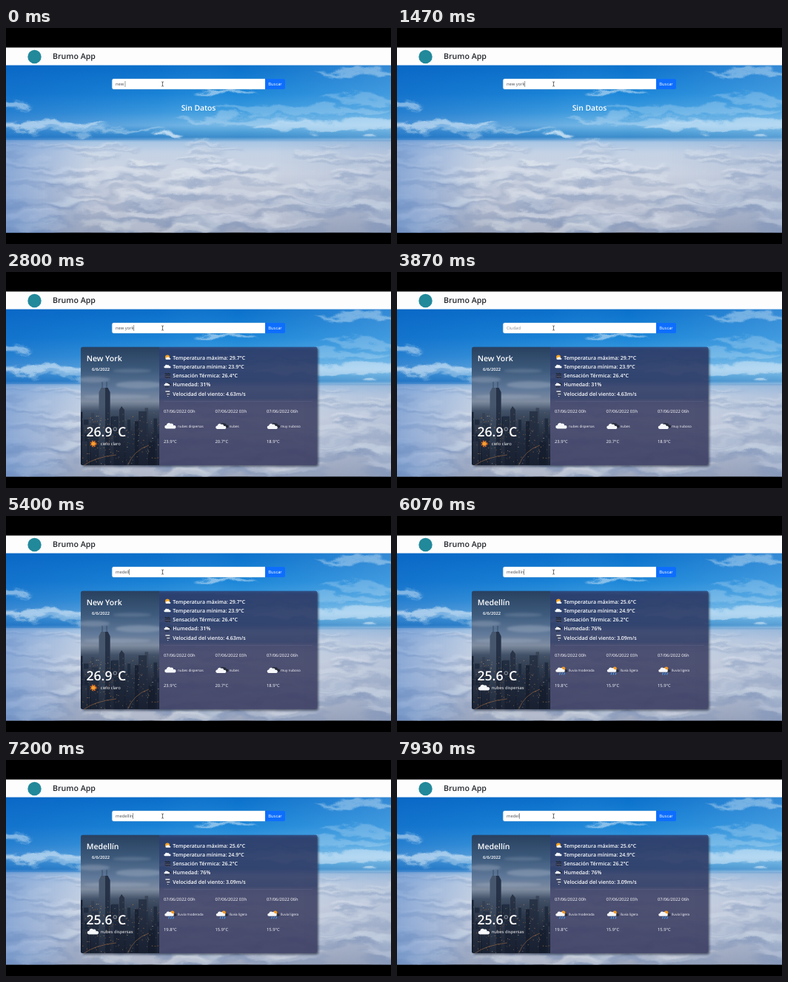
Write an HTML page that moves like this. It is 520x293 px and loops after 8000 ms.

```html
<!DOCTYPE html>
<html lang="es">
<head>
<meta charset="utf-8">
<title>Brumo App</title>
<style>
html, body { margin: 0; width: 100%; height: 100%; overflow: hidden; background: #000; }
svg { display: block; width: 100vw; height: 100vh; }
text { font-family: "Open Sans", "Noto Sans", sans-serif; font-size: 5.8px; fill: #fff; white-space: pre; text-rendering: geometricPrecision; }
.bold text, text.bold { font-weight: 600; }
.small { font-size: 4.6px; }
</style>
</head>
<body>
<svg viewBox="0 0 520 293" preserveAspectRatio="none">
  <defs>
    <linearGradient id="sky" x2="0" y2="1">
      <stop offset="0" stop-color="#0a70cb"/>
      <stop offset=".17" stop-color="#1b86d8"/>
      <stop offset=".28" stop-color="#3f9ddf"/>
      <stop offset=".36" stop-color="#73b6e5"/>
      <stop offset=".4" stop-color="#4b9dd7"/>
      <stop offset=".43" stop-color="#3a8bcb"/>
      <stop offset=".46" stop-color="#a9c6e4"/>
      <stop offset=".52" stop-color="#c4d2e5"/>
      <stop offset=".65" stop-color="#ccd4e2"/>
      <stop offset=".8" stop-color="#bac2d4"/>
      <stop offset="1" stop-color="#9ea7bd"/>
    </linearGradient>
    <linearGradient id="west">
      <stop offset="0" stop-color="#0a5fc0" stop-opacity=".48"/>
      <stop offset=".4" stop-color="#0a5fc0" stop-opacity=".1"/>
      <stop offset=".6" stop-color="#d8ecfa" stop-opacity="0"/>
      <stop offset="1" stop-color="#d8ecfa" stop-opacity=".2"/>
    </linearGradient>
    <linearGradient id="west-deck">
      <stop offset="0" stop-color="#5585cb" stop-opacity=".55"/>
      <stop offset=".22" stop-color="#5585cb" stop-opacity="0"/>
      <stop offset=".7" stop-color="#5f7fb4" stop-opacity="0"/>
      <stop offset="1" stop-color="#5f7fb4" stop-opacity=".18"/>
    </linearGradient>
    <linearGradient id="dusk" x2="0" y2="1">
      <stop offset="0" stop-color="#28405f"/>
      <stop offset=".2" stop-color="#3d5a7c"/>
      <stop offset=".36" stop-color="#60799a"/>
      <stop offset=".46" stop-color="#7f8ca0"/>
      <stop offset=".54" stop-color="#46566d"/>
      <stop offset="1" stop-color="#141b2a"/>
    </linearGradient>
    <linearGradient id="night" x2="0" y2="1">
      <stop offset="0" stop-color="#111827" stop-opacity="0"/>
      <stop offset="1" stop-color="#111827" stop-opacity=".75"/>
    </linearGradient>
    <filter id="billow" filterUnits="userSpaceOnUse" x="-30" y="30" width="580" height="270" color-interpolation-filters="sRGB">
      <feGaussianBlur stdDeviation="2.6 1.2" result="blurred"/>
      <feTurbulence type="fractalNoise" baseFrequency=".022 .05" numOctaves="4" seed="4"/>
      <feDisplacementMap in="blurred" scale="26" xChannelSelector="R" yChannelSelector="G"/>
    </filter>
    <filter id="shade" x="-10%" y="-10%" width="120%" height="120%"><feGaussianBlur stdDeviation="1.5"/></filter>
    <clipPath id="view"><rect y="50" width="520" height="227.5"/></clipPath>
    <clipPath id="frame"><rect x="101" y="101.5" width="319.5" height="160.5" rx="3"/></clipPath>
    <clipPath id="photo"><rect x="101" y="101.5" width="106" height="160.5"/></clipPath>

    <path id="puff" d="M-6 3.5a2.4 2.4 0 0 1 .3-4.8 3.2 3.2 0 0 1 5.4-2 2.8 2.8 0 0 1 4 2.5 2.2 2.2 0 0 1 2 4.3z"/>
    <g id="sun">
      <circle r="3.6" fill="none" stroke="#ee6a1c" stroke-width="1.6" stroke-dasharray="1.7 1.2"/>
      <circle r="2.8" fill="#ff9f2e"/>
    </g>
    <g id="cloud"><use href="#puff" fill="#f5f7fa"/></g>
    <g id="overcast">
      <use href="#puff" fill="#252a38" transform="translate(2.5 -.6) scale(.85)"/>
      <use href="#puff" fill="#f5f7fa" transform="translate(-1.2 .7) scale(.92)"/>
    </g>
    <g id="sunny"><circle cx="-.5" cy="-.8" r="5" fill="#f6a323"/><use href="#cloud" transform="translate(1.5 2) scale(.75)"/></g>
    <path id="drops" d="M-4 3l-1 3M-1 3l-1 3M2 3l-1 3" stroke="#4b9df0" stroke-width="1.1"/>
    <g id="rain">
      <path d="M-4 3l-1 4M-1 3l-1 4M2 3l-1 4" stroke="#20242f" stroke-width="1.4"/>
      <use href="#overcast" transform="translate(0 -1) scale(.9)"/>
    </g>
    <g id="showers">
      <use href="#puff" fill="#2b3040" transform="translate(2.6 .2) scale(.75)"/>
      <circle cx="2.2" cy="-2" r="2.6" fill="#f39a24"/>
      <use href="#drops" transform="translate(2 .3)"/>
      <use href="#cloud" transform="translate(-1.5 0) scale(.82)"/>
    </g>
    <g id="heat" fill="none" stroke="#23232b" stroke-width="1.7">
      <path d="M-6-4q1.5-2 3 0t3 0 3 0 3 0M-6 0q1.5-2 3 0t3 0 3 0 3 0M-6 4q1.5-2 3 0t3 0 3 0 3 0"/>
      <path d="M-5 2H5" stroke="#77747e" stroke-width=".8"/>
    </g>
    <g id="wind" fill="none" stroke="#e0e2e8" stroke-linecap="round">
      <path d="M-4-5H4" stroke-width="2.4"/><path d="M-4-2H3" stroke="#3a3e4a" stroke-width="2"/>
      <path d="M-1 1H4" stroke-width="2.2"/><path d="M0 4H3" stroke="#3a3e4a" stroke-width="1.8"/><path d="M0 6H1" stroke-width="1.5"/>
    </g>
  </defs>

  <rect width="520" height="293"/>
  <g clip-path="url(#view)">
    <rect y="50" width="520" height="228" fill="url(#sky)"/>
    <rect y="50" width="520" height="102" fill="url(#west)"/>
    <g id="clouds" filter="url(#billow)"></g>
    <rect y="152" width="520" height="126" fill="url(#west-deck)"/>
  </g>
  <rect y="26.5" width="520" height="24" fill="#fdfdfe"/>
  <circle cx="38.5" cy="39" r="9.2" fill="#21899a"/>
  <text class="bold" x="63" y="41.8" style="font-size:10.6px;fill:#24272c">Brumo App</text>

  <path d="M145.5 69H350v14H145.5a2.2 2.2 0 0 1-2.2-2.2v-9.6a2.2 2.2 0 0 1 2.2-2.2z" fill="#fff" stroke="#c4d3e4" stroke-width=".4"/>
  <path d="M350 69h24.8a2.2 2.2 0 0 1 2.2 2.2v9.6a2.2 2.2 0 0 1-2.2 2.2H350z" fill="#0d6efd"/>
  <text x="354.3" y="78.2">Buscar</text>
  <text id="query" x="148" y="78.2"></text>
  <rect id="caret" y="72" width=".5" height="8" fill="#33363b"/>
  <path d="M210 73h1l.5.4.5-.4h1M211.5 73.2v5.6M210 79h1l.5-.4.5.4h1" fill="none" stroke="#17191d" stroke-width=".6"/>

  <text id="empty" class="bold" x="260" y="112" text-anchor="middle" style="font-size:10.3px">Sin Datos</text>

  <g id="card">
    <rect x="103" y="103.5" width="319" height="160.5" rx="3" fill="#10172b" opacity=".6" filter="url(#shade)"/>
    <g clip-path="url(#frame)">
      <rect x="101" y="101.5" width="320" height="161" fill="url(#sky)" opacity=".35"/>
      <rect x="207" y="101.5" width="214" height="161" fill="#35355f" opacity=".68"/>
      <g clip-path="url(#photo)">
        <rect x="101" y="101" width="106" height="162" fill="url(#dusk)"/>
        <g fill="#a9b5c6" filter="url(#shade)">
          <ellipse cx="118" cy="146" rx="22" ry="4" opacity=".35"/>
          <ellipse cx="180" cy="153" rx="32" ry="5" opacity=".4"/>
          <ellipse cx="170" cy="134" rx="26" ry="2.5" opacity=".25"/>
          <ellipse cx="150" cy="169" rx="45" ry="3" opacity=".35"/>
        </g>
        <g id="city"></g>
        <path d="M125.5 263V163l3-6h9l3 6v100z" fill="#46566d"/>
        <path d="M134 263V157h3.5l3 6v100z" fill="#263247"/>
        <path d="M130 157v-8M136 157v-8" stroke="#33435a" stroke-width=".8"/>
        <path d="M153 263v-76l3-5 4 5v76zM179 263v-74h11v74z" fill="#2b364a"/>
        <rect x="101" y="180" width="106" height="83" fill="url(#night)"/>
        <path d="M104 263q16-12 45-15M164 263q8-21 29-28" fill="none" stroke="#c98245" stroke-width="1" opacity=".45"/>
        <g id="lights"></g>
      </g>
    </g>
    <path d="M213 175.3H414" stroke="#a8abc5" stroke-width=".5" opacity=".25"/>
    <text class="bold" id="place" x="108.7" y="121" style="font-size:10.5px"></text>
    <text class="bold" x="116" y="133.5" style="font-size:5.7px">6/6/2022</text>
    <text class="bold" x="108.5" y="223" style="font-size:17.6px"><tspan id="now"></tspan><tspan fill-opacity=".4">°</tspan>C</text>
    <use id="nowIcon" x="118" y="233"/>
    <text id="sky-now" x="127.7" y="235.2"></text>
    <g id="details" class="bold"></g>
    <g id="forecast"></g>
  </g>
</svg>

<script>
const LOOP = 8000, BLINK = 530;
const FIRST_RESULT = 1600, ICONS_LOADED = 2330, SECOND_RESULT = 6070;
const $ = id => document.getElementById(id);

function add(parent, tag, attrs, text = '') {
  const node = document.createElementNS('http://www.w3.org/2000/svg', tag);
  for (const name in attrs) node.setAttribute(name, attrs[name]);
  node.textContent = text;
  return parent.appendChild(node);
}

let seed = 11;
const random = () => (seed = seed * 16807 % 2147483647) / 2147483647;
const between = (a, b) => a + (b - a) * random();

function cloud(cx, cy, rx, ry, fill, opacity) {
  add($('clouds'), 'ellipse', { cx, cy, rx, ry, fill, opacity });
}

function paintSky() {
  // High wisps, then a deck of clouds that grows towards the viewer.
  [[50, 133, 85, 4, .6], [130, 139, 90, 2.5, .4], [295, 86, 42, 2, .6], [12, 104, 24, 4, .5],
   [440, 131, 110, 7, .5], [400, 112, 120, 6, .25], [480, 96, 60, 5, .25], [480, 60, 60, 4, .4],
   [330, 124, 100, 4, .3], [208, 148, 8, 3, .7], [223, 147, 9, 4, .75], [487, 149, 12, 3, .6]]
    .forEach(([x, y, rx, ry, alpha]) => cloud(x, y, rx, ry, '#e6f2fb', alpha));
  for (let i = 0; i < 110; i++) {
    const depth = i / 110, x = between(-20, 540), y = 155 + 121 * depth;
    const rx = between(16, 34) + 20 * depth, ry = between(1.5, 3) + 6 * depth;
    cloud(x, y + ry, rx, ry * .8, '#7f94b8', .24);
    cloud(x - 4, y - ry * .4, rx * .85, ry * .8, '#e6ebf2', .4 - .18 * depth);
  }
}

function paintCity() {
  for (let i = 0; i < 34; i++) {
    const y = between(180, 224) + i * .6;
    add($('city'), 'rect', {
      x: between(98, 202), y, width: between(4, 11), height: 263 - y,
      fill: ['#2c3a50', '#243146', '#3b475b', '#1c2638'][i % 4]
    });
  }
  for (let i = 0; i < 190; i++)
    add($('lights'), 'rect', {
      x: between(102, 206), y: between(190, 261), width: between(.6, 1.5), height: .8,
      fill: ['#e89a4e', '#c97a3c', '#d8c3a0'][i % 3], opacity: between(.25, .75)
    });
}

const reports = [
  { place: 'New York', now: '26.9', icon: 'sun', sky: 'cielo claro',
    details: ['29.7°C', '23.9°C', '26.4°C', '31%', '4.63m/s'],
    forecast: [['nubes dispersas', '23.9°C', 'cloud'], ['nubes', '20.7°C', 'overcast'], ['muy nuboso', '18.9°C', 'overcast']] },
  { place: 'Medellín', now: '25.6', icon: 'cloud', sky: 'nubes dispersas',
    details: ['25.6°C', '24.9°C', '26.2°C', '76%', '3.09m/s'],
    forecast: [['lluvia moderada', '19.8°C', 'showers'], ['lluvia ligera', '15.9°C', 'showers'], ['lluvia ligera', '15.9°C', 'showers']] }
];
const labels = ['Temperatura máxima', 'Temperatura mínima', 'Sensación Térmica', 'Humedad', 'Velocidad del viento'];
const labelIcons = ['sunny', 'cloud', 'heat', 'rain', 'wind'];

const details = labels.map((label, i) => {
  const y = 116 + i * 12.25;
  add($('details'), 'use', { href: '#' + labelIcons[i], transform: `translate(218.3 ${y}) scale(.6)` });
  return add($('details'), 'text', { x: 225.3, y: y + 2.5, style: 'font-size:7px' });
});

const columns = [213, 282.5, 352].map((x, i) => {
  const box = $('forecast');
  add(box, 'text', { x, y: 191.3 }, `07/06/2022 0${i * 3}h`);
  return {
    x,
    icon: add(box, 'use', { transform: `translate(${x + 9.5} 209)` }),
    sky: add(box, 'text', { class: 'small' }),
    temp: add(box, 'text', { x })
  };
});

function showReport(report, withIcons) {
  $('place').textContent = report.place;
  $('now').textContent = report.now;
  $('nowIcon').setAttribute('href', '#' + report.icon);
  $('sky-now').textContent = report.sky;
  details.forEach((node, i) => node.textContent = `${labels[i]}: ${report.details[i]}`);
  columns.forEach(({ x, icon, sky, temp }, i) => {
    const [text, degrees, name] = report.forecast[i];
    icon.setAttribute('href', '#' + name);
    icon.setAttribute('visibility', withIcons ? 'inherit' : 'hidden');
    sky.textContent = text;
    sky.setAttribute('x', withIcons ? x + 19 : x);
    sky.setAttribute('y', withIcons ? 210.7 : 205.7);
    temp.textContent = degrees;
    temp.setAttribute('y', withIcons ? 231.7 : 220.2);
  });
}

// Each entry is a moment and the search text from then on.
const typing = [[0, 'new '], [530, 'new y'], [730, 'new yo'], [1070, 'new yor'], [1330, 'new york']];
for (let i = 0; i < 8; i++) typing.push([3070 + i * 37, 'new york'.slice(0, 7 - i)]);
[4400, 4730, 4830, 4930, 5100, 5390, 5600, 5730].forEach((at, i) => typing.push([at, 'medellín'.slice(0, i + 1)]));
[7730, 7870, 7925].forEach((at, i) => typing.push([at, 'medellín'.slice(0, 7 - i)]));

function showQuery(t) {
  const [since, text] = typing.filter(([at]) => at <= t).pop();
  const query = $('query');
  const shown = text || 'Ciudad';
  if (query.textContent !== shown) {
    query.textContent = shown;
    query.style.fill = text ? '#4a4e54' : '#858b92';
    $('caret').setAttribute('x', 148 + (text ? query.getComputedTextLength() : 0));
  }
  const lit = Math.floor((t - since) / BLINK) % 2 === 0;
  $('caret').setAttribute('visibility', lit ? 'visible' : 'hidden');
}

let shownStage = -1;
function draw() {
  const t = (performance.now() - start) % LOOP;
  const stage = [FIRST_RESULT, ICONS_LOADED, SECOND_RESULT].filter(at => at <= t).length;
  if (stage !== shownStage) {
    shownStage = stage;
    $('empty').setAttribute('visibility', stage ? 'hidden' : 'visible');
    $('card').setAttribute('visibility', stage ? 'visible' : 'hidden');
    showReport(reports[stage > 2 ? 1 : 0], stage > 1);
  }
  showQuery(t);
  requestAnimationFrame(draw);
}

paintSky();
paintCity();
const start = performance.now();
draw();
</script>
</body>
</html>
```
